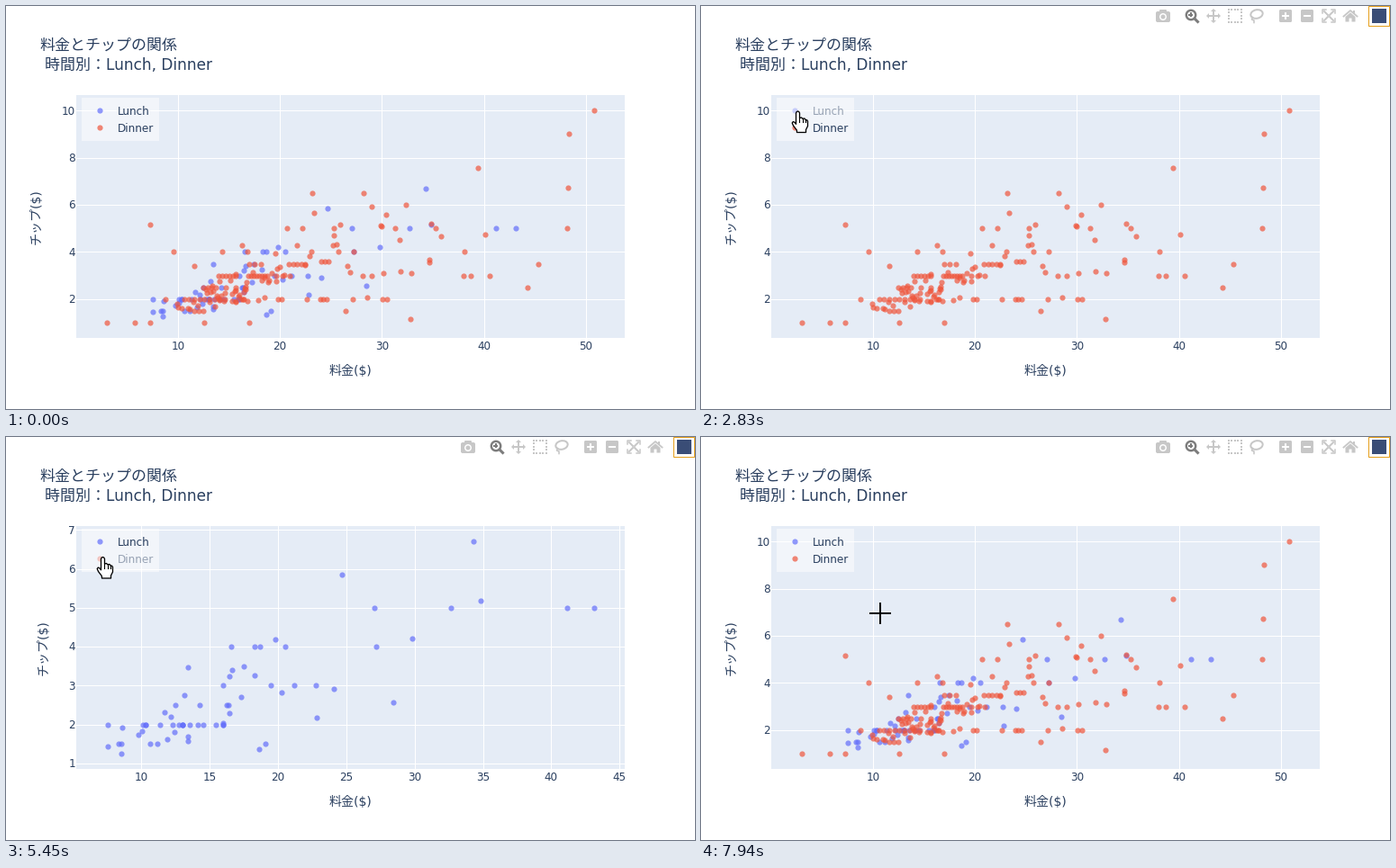
A matplotlib script for the animation above (8000 ms loop, 765 px wide and 448 px high).

```python
import numpy as np
import matplotlib.pyplot as plt
from matplotlib.animation import FuncAnimation
from matplotlib.patches import Circle, Ellipse, FancyBboxPatch, Polygon, Rectangle
from matplotlib.transforms import Affine2D

W, H, DPI = 765, 448, 100
STEP, LOOP = 40, 8000
PT = 72 / DPI  # points per pixel

INK, PAPER = "#2a3f5f", "#e5ecf6"
BLUE, RED = "#636efa", "#ef553b"
ICON, ACTIVE = "#c7c7c7", "#7c7c7c"

plt.rcParams["font.family"] = ["DejaVu Sans", "Noto Sans CJK JP"]
fig = plt.figure(figsize=(W / DPI, H / DPI), dpi=DPI, facecolor="white")
ax = fig.add_axes([0, 0, 1, 1])
ax.set(xlim=(0, W), ylim=(H, 0))
ax.axis("off")


def text(x, y, s, size, **kw):
    return ax.text(x, y, s, fontsize=size * PT, color=INK, va="baseline", **kw)


def line(xs, ys, color, width=1.0, **kw):
    return ax.plot(xs, ys, color=color, lw=width * PT, **kw)[0]


def box(x, y, w, h, color, **kw):
    return ax.add_patch(Rectangle((x, y), w, h, fc=color, lw=0, **kw))


# ---- data: (bill, tip) ----
def expand(rows, singles):
    pts = [(x, tip) for tip, xs in rows.items() for x in xs]
    return np.array(pts + singles)


lunch = expand(
    {2: [7.51, 10.09, 10.33, 10.34, 11.38, 12.26, 12.74, 13, 13, 13.03, 13.51,
         14.15, 14.52, 15.48, 15.95, 16],
     1.5: [8.35, 8.52, 10.65, 11.17, 19.08],
     2.5: [12.48, 14.26, 16.27, 16.4],
     3: [15.98, 19.44, 21.16, 22.76],
     4: [16.58, 18.28, 18.71, 20.53, 27.2],
     5: [27.05, 32.68, 41.19, 43.11]},
    [(17.29, 2.71), (16.66, 3.4), (10.07, 1.83), (15.98, 2.03), (34.83, 5.17),
     (24.71, 5.85), (12.43, 1.8), (24.08, 2.92), (11.69, 2.31), (13.42, 1.68),
     (29.8, 4.2), (22.82, 2.18), (20.27, 2.83), (18.26, 3.25), (8.51, 1.25),
     (13.16, 2.75), (17.47, 3.5), (34.3, 6.7), (16.43, 2.3), (18.64, 1.36),
     (11.87, 1.63), (9.78, 1.73), (19.81, 4.19), (28.44, 2.56), (7.56, 1.44),
     (16.47, 3.23), (12.16, 2.2), (13.42, 3.48), (8.58, 1.92), (13.42, 1.58)])

spread = expand(
    {1: [3.07, 5.75, 7.25, 12.6, 17],
     2: [8.77, 22.67, 24.01, 24.27, 24.55, 27.18, 30.06, 30.46],
     3: [28.15, 28.97, 38.01, 38.73, 40.55],
     4: [9.6, 14.31, 16.82, 23.1, 25.71, 27.28, 38.07],
     5: [20.69, 22.23, 25.28, 31.27, 35.26, 48.17]},
    [(50.81, 10), (48.33, 9), (39.42, 7.58), (48.27, 6.73), (28.17, 6.5),
     (23.17, 6.5), (32.4, 6), (29.03, 5.92), (23.33, 5.65), (30.4, 5.6),
     (25.89, 5.16), (7.25, 5.15), (29.85, 5.14), (29.93, 5.07), (34.81, 5.2),
     (35.83, 4.67), (40.17, 4.73), (25.29, 4.71), (31.71, 4.5), (25.56, 4.34),
     (25.21, 4.29), (21.7, 4.3), (16.32, 4.3), (34.65, 3.68), (34.63, 3.55),
     (26.59, 3.41), (31.85, 3.18), (32.9, 3.11), (30.14, 3.09), (26.87, 3.13),
     (28.55, 2.05), (32.83, 1.17), (11.61, 3.39), (26.41, 1.5), (44.3, 2.5),
     (45.35, 3.5)])

# Even runs at round tips, plus a seeded cloud along the trend.
runs = [(3, 14, 15.7, 6), (3, 16.9, 18.8, 8), (3, 19.6, 21, 3),
        (2, 10.6, 14.6, 9), (2, 16.2, 16.5, 3), (2, 19.8, 20.2, 2),
        (3.5, 17, 18.1, 3), (3.5, 20.9, 22.5, 5), (1.5, 11.6, 12.5, 3),
        (2.5, 12.5, 13.3, 3), (3.6, 24.1, 24.8, 3)]
even = [(x, tip) for tip, a, b, n in runs for x in np.linspace(a, b, n)]
rng = np.random.default_rng(7)
bill = rng.triangular(9.4, 14.5, 23.7, 55)
tip = np.clip(0.155 * bill + rng.normal(0, 0.4, 55), 1.2, 4.1)
dinner = np.vstack([spread, even, np.column_stack([bill, tip])])


# ---- chart ----
def full(x, y):
    return 190.8 + (x - 10) * 11.325, 325.8 - (y - 2) * 26.19


def zoomed(x, y):
    return 150.3 + (x - 10) * 15.17, 362.8 - (y - 1) * 43.25


def dots(view, pts, color, z):
    x, y = view(pts[:, 0], pts[:, 1])
    return ax.scatter(x, y, s=(6.2 * PT) ** 2, c=color, alpha=0.7, lw=0, zorder=z)


def axes(view, xticks, yticks, title_x):
    parts = []
    for v in xticks:
        x = view(v, 0)[0]
        parts += [line([x, x], [99, 369], "white", zorder=1),
                  text(x, 382, str(v), 12, ha="center")]
    for v in yticks:
        y = view(0, v)[1]
        parts += [line([78, 687], [y, y], "white", zorder=1),
                  text(77, y + 4.4, str(v), 12, ha="right")]
    parts.append(text(title_x, 234, "チップ($)", 14, ha="center",
                      rotation=90, rotation_mode="anchor"))
    return parts


box(78, 99, 609, 270, PAPER, zorder=0)
text(37, 49, "料金とチップの関係", 17)
text(43, 71, "時間別：Lunch, Dinner", 17)
text(382.5, 410, "料金($)", 14, ha="center")

full_axes = axes(full, range(10, 51, 10), range(2, 11, 2), 38)
zoom_axes = axes(zoomed, range(10, 46, 5), range(1, 8), 46)
lunch_full = dots(full, lunch, BLUE, 2)
dinner_full = dots(full, dinner, RED, 3)
lunch_zoom = dots(zoomed, lunch, BLUE, 2)

box(84, 102, 86, 48, "white", alpha=0.5, zorder=4)


def entry(y, name, color):
    dot = ax.scatter([104.3], [y], s=(6.2 * PT) ** 2, c=color, alpha=0.7, lw=0, zorder=5)
    return dot, text(124, y + 4.7, name, 12, zorder=5)


lunch_key = entry(116.3, "Lunch", BLUE)
dinner_key = entry(135.3, "Dinner", RED)


def mute(key, off):
    key[0].set_alpha(0.3 if off else 0.7)
    key[1].set_alpha(0.45 if off else 1)


# ---- toolbar ----
def rounded(x, y, w, h, color, r=2):
    ax.add_patch(FancyBboxPatch((x + r, y + r), w - 2 * r, h - 2 * r, fc=color, lw=0,
                                boxstyle=f"round,pad={r}"))


def disc(x, y, r, color):
    ax.add_patch(Circle((x, y), r, fc=color, lw=0))


def shape(pts, color):
    ax.add_patch(Polygon(pts, fc=color, lw=0))


def toolbar():
    rounded(505, 6, 16, 12, ICON)
    rounded(509, 4, 8, 5, ICON, 1)
    disc(513, 12, 4, "white")
    disc(513, 12, 2.5, ICON)

    ax.add_patch(Circle((544, 10), 5.2, fc="none", ec=ACTIVE, lw=2.4 * PT))
    line([548, 551.5], [14, 17.5], ACTIVE, 3)
    box(541.5, 9, 5, 2, ACTIVE)
    box(543, 7.5, 2, 5, ACTIVE)

    box(563, 10, 12, 2, ICON)
    box(568, 5, 2, 12, ICON)
    for dx, dy in ((1, 0), (-1, 0), (0, 1), (0, -1)):
        px, py = 569 + 5 * dx, 11 + 5 * dy
        shape([(px + 3 * dx, py + 3 * dy), (px + 3 * dy, py + 3 * dx),
               (px - 3 * dy, py - 3 * dx)], ICON)

    for k in range(5):
        s = 3.5 * k
        for x, y in ((585 + s, 3), (585 + s, 17), (585, 3 + s), (599, 3 + s)):
            box(x, y, 2, 2, ICON)

    ax.add_patch(Ellipse((617, 9), 13.5, 9.5, angle=-12, fc="none", ec=ICON, lw=2 * PT))
    line([612.5, 611.5, 614, 614], [12.5, 15, 16, 18.5], ICON, 1.6)

    for x in (642, 666):
        rounded(x, 4, 14, 14, ICON, 1.5)
        box(x + 3, 10, 8, 2, "white")
    box(648, 7, 2, 8, "white")

    for sx in (-1, 1):
        for sy in (-1, 1):
            line([697 + sx * 3, 697 + sx * 7.2, 697 + sx * 7.2],
                 [11 + sy * 7.2, 11 + sy * 7.2, 11 + sy * 3], ICON, 1.5)
            line([697 + sx, 697 + sx * 5], [11 + sy, 11 + sy * 5], ICON, 2)

    line([713.5, 721, 728.5], [11.5, 5, 11.5], ICON, 1.8)
    shape([(715.5, 12), (721, 7.3), (726.5, 12), (726.5, 17.5), (722.5, 17.5),
           (722.5, 13.5), (719.5, 13.5), (719.5, 17.5), (715.5, 17.5)], ICON)
    box(724.5, 5, 2, 4, ICON)

    box(745, 3, 16, 16, "#3a4d76")


toolbar()
veil = box(500, 0, 265, 26, "white", zorder=6)
focus = ax.add_patch(Rectangle((741.5, 0.5), 23, 22, fc="none", ec="#e59f1c",
                               lw=PT, zorder=7))


# ---- pointer ----
def outline(pts):
    return ax.add_patch(Polygon(pts, fc="white", ec="black", lw=1.3 * PT,
                                joinstyle="round", zorder=9))


arrow = [outline([(0, 0), (0, 16), (3.7, 12.6), (6.2, 18.3), (8.8, 17.2),
                  (6.3, 11.6), (11.3, 11.4)])]
hand = [outline([(-2, 2), (-1.2, 0.5), (0, 0), (1.2, 0.5), (2, 2), (2, 7.5),
                 (4, 7), (5.4, 8.3), (7.5, 8), (8.6, 9.6), (10, 9.6), (11, 11),
                 (11, 16.5), (9, 20.5), (9, 23.5), (-1, 23.5), (-1.2, 21),
                 (-5, 16), (-6.3, 13), (-5.2, 11.6), (-3.6, 12.3), (-2, 14.3)])]
hand += [line([x, x], [y, 12.5], "black", 1.1, zorder=10)
         for x, y in ((2, 7.5), (5.4, 8.3), (8.6, 9.6))]
cross = [line([-12, 12], [0, 0], "black", 2, zorder=9, solid_capstyle="butt"),
         line([0, 0], [-12, 12], "black", 2, zorder=9, solid_capstyle="butt")]

# (ms, x, y)
path = np.array([
    (800, 0, 74), (1000, 57, 84), (1290, 108, 117), (1420, 108, 106),
    (1540, 108, 106), (1630, 111, 117), (1720, 107, 117), (1900, 110, 117),
    (2500, 110, 117), (2560, 107.5, 117), (2860, 107.5, 117), (3030, 105, 117),
    (4200, 105, 117), (4420, 89, 138), (4650, 107.5, 133.5),
    (7460, 107.5, 133.5), (7940, 199, 196)])


def pointer(t):
    x, y = (np.interp(t, path[:, 0], path[:, k]) for k in (1, 2))
    if x < 78:
        active = arrow
    elif 84 <= x <= 170 and 102 <= y <= 146:
        active = hand
    else:
        active = cross
    for parts in (arrow, hand, cross):
        for p in parts:
            p.set_visible(parts is active and t >= 800)
            p.set_transform(Affine2D().translate(x, y) + ax.transData)


PRESSES = ((3430, 3630), (4920, 5120), (6640, 6780))


def draw(i):
    t = i * STEP + 30
    no_lunch = 2360 <= t < 3900
    no_dinner = 5450 <= t < 7110
    for p in full_axes:
        p.set_visible(not no_dinner)
    for p in zoom_axes:
        p.set_visible(no_dinner)
    lunch_full.set_visible(not (no_lunch or no_dinner))
    dinner_full.set_visible(not no_dinner)
    lunch_zoom.set_visible(no_dinner)
    mute(lunch_key, no_lunch)
    mute(dinner_key, no_dinner)

    fade = np.clip((t - 800) / 300, 0, 1)
    veil.set_alpha((1 - fade) ** 2)
    focus.set_visible(t >= 2160 and not any(a <= t < b for a, b in PRESSES))
    pointer(t)
    return []


anim = FuncAnimation(fig, draw, frames=LOOP // STEP, interval=STEP,
                     repeat=True, repeat_delay=0, blit=False)
plt.show()
```
